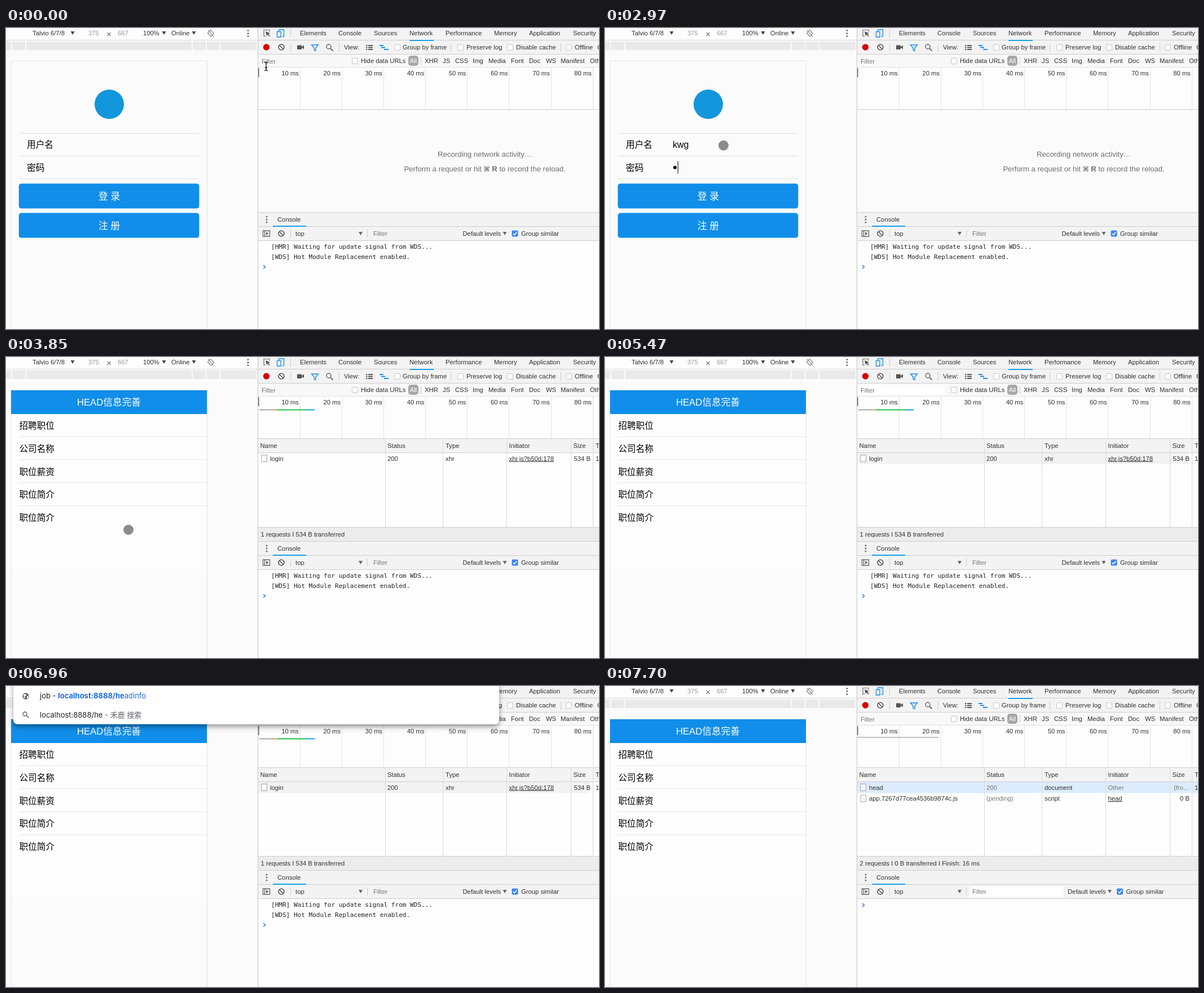
An HTML page that plays this animation: 1051x533 px, repeating every 8000 ms.

```html
<!DOCTYPE html>
<html lang="zh">
<head>
<meta charset="utf-8">
<style>
html, body { margin: 0; width: 100%; height: 100%; overflow: hidden; background: #fbfbfb; }
svg { display: block; width: 1051px; height: 533px; }
text { font-family: "Liberation Sans", "Noto Sans CJK SC", "DejaVu Sans", sans-serif; font-size: 11.25px; fill: #303030; white-space: pre; }
.cn { font-family: "Liberation Sans", "Noto Sans CJK SC", sans-serif; fill: #000; }
.mono { font-family: "DejaVu Sans Mono", monospace; font-size: 11.05px; fill: #222; }
.omni { font-family: Inter, "Noto Sans CJK SC", sans-serif; font-size: 13px; fill: #222; }
.key { font-family: "DejaVu Sans", sans-serif; font-size: 12px; font-weight: bold; }
</style>
</head>
<body>
<svg id="stage" viewBox="0 0 1051 533" xmlns="http://www.w3.org/2000/svg"></svg>
<script>
const LOOP = 8000;
const BLUE = '#108ee9', TAB = '#1aa0e8', BAR = '#f3f3f3', EDGE = '#cdcdcd', GRAY = '#777';

const text = (x, y, s, o = '') => `<text x="${x}" y="${y}" ${o}>${s}</text>`;
const rect = (x, y, w, h, fill, o = '') => `<rect x="${x}" y="${y}" width="${w}" height="${h}" fill="${fill}" ${o}/>`;
const hline = (x1, x2, y, c = EDGE) => rect(x1, y, x2 - x1, 1, c);
const vline = (x, y1, y2, c = EDGE) => rect(x, y1, 1, y2 - y1, c);
const path = (d, c = '#6e6e6e', w = 1.4) => `<path d="${d}" fill="none" stroke="${c}" stroke-width="${w}"/>`;
const solid = (d, c) => `<path d="${d}" fill="${c}"/>`;
const group = (id, s, o = '') => `<g id="${id}" ${o}>${s}</g>`;
const fill = c => `style="fill:${c}"`;
const arrow = (x, y, c = '#444') => solid(`M${x - 3.5} ${y - 3}h7l-3.5 6z`, c);
const dots = (x, y) => [-5, 0, 5].map(d => `<circle cx="${x}" cy="${y + d}" r="1.5" fill="#6e6e6e"/>`).join('');
const checkbox = (x, y) => rect(x - 4.5, y - 4.5, 10, 10, '#fff', 'rx="1.5" stroke="#c4c4c4"');
const ticked = (x, y) => rect(x - 5.5, y - 5.5, 11, 11, '#3b86f0', 'rx="2"') + path(`M${x - 3} ${y}l2.2 2.5 4-5`, '#fff', 1.6);
const banned = (x, y) => `<circle cx="${x}" cy="${y}" r="5" fill="none" stroke="#555" stroke-width="1.6"/>` + path(`M${x - 3.5} ${y - 3.5}l7 7`, '#555', 1.6);
const inspect = path('M460 14.5h-3v-11h10v3', '#6e6e6e', 1.2) + solid('M460 6l8 3.2-3 1.2 3 3.4-1.3 1.2-3-3.4-1.6 2.7z', '#555');

// Readouts of the device bar, also seen through the suggestion list
const deviceBar =
  text(146, 13, '375', fill('#999')) + path('M179.5 8l6 6m0-6l-6 6', '#777', 1.2) + text(198, 13, '667', fill('#999')) +
  text(243, 13, '100%') + arrow(280, 9) + text(293, 13, 'Online') + arrow(333, 9) +
  path('M357.5 9l5-5.5 6 6-5 5.5z', '#777', 1.1) + path('M358 3.5l10 12', '#777', 1.1) + dots(429, 9.5);

function deviceFrame() {
  const cells = [[0, 9], [11, 34], [36, 329], [331, 354], [356, 378], [380, 444]];
  return rect(0, 0, 446, 533, '#fbfbfb') + rect(0, 0, 446, 22, '#fdfdfd') + hline(0, 446, 21, '#d6d6d6') +
    text(47, 13, 'Talvio 6/7/8') + arrow(118, 9) + deviceBar +
    cells.map(([a, b]) => rect(a, 24, b - a, 15, '#e9e9e9')).join('') +
    hline(9, 357, 58, '#e5e5e5') + vline(8.5, 58, 533, '#e2e2e2') + vline(356, 58, 533, '#e2e2e2');
}

function loginPage() {
  const button = (y, s) => rect(22.7, y - 0.4, 319.7, 43.9, BLUE, 'rx="4.5"') +
    text(183, y + 27.5, s, 'class="cn" text-anchor="middle" style="font-size:17px;fill:#fff;font-weight:500"');
  return `<circle cx="183" cy="135" r="26" fill="#1296db"/>` +
    [186, 226, 266.5].map(y => hline(23, 342, y, '#dedede')).join('') +
    text(37, 212, '用户名', 'class="cn" style="font-size:15.7px"') +
    text(37, 252.5, '密码', 'class="cn" style="font-size:15.7px"') +
    text(120, 212, '', 'id="user" class="cn" style="font-size:16px"') +
    [0, 1, 2].map(i => `<circle id="pw${i}" cx="${124 + i * 9}" cy="247" r="3"/>`).join('') +
    rect(0, 0, 1, 22, '#000', 'id="caret"') +
    button(276, '登 录') + button(328, '注 册');
}

function infoPage() {
  const labels = ['招聘职位', '公司名称', '职位薪资', '职位简介', '职位简介'];
  return rect(9.5, 59, 346.5, 316, '#fdfdfd') + rect(9, 59, 347, 42, BLUE) +
    text(182.5, 86, 'HEAD信息完善', 'class="cn" text-anchor="middle" style="font-size:16.7px;fill:#fff"') +
    labels.map((s, i) => text(23.5, 127 + i * 40.75, s, 'class="cn" style="font-size:15.6px"') +
      (i < 4 ? hline(23, 356, 140.5 + i * 40.8, '#e6e6e6') : '')).join('');
}

function toolbars() {
  const tabs = [[521, 'Elements'], [589, 'Console'], [652, 'Sources'], [715, 'Network'], [779, 'Performance'],
    [865, 'Memory'], [927, 'Application'], [1005, 'Security']];
  const kinds = [[742, 'XHR'], [774, 'JS'], [796, 'CSS'], [827, 'Img'], [855, 'Media'], [895, 'Font'], [927, 'Doc'],
    [957, 'WS'], [983, 'Manifest'], [1035, 'Other']];
  const boxes = [[693, 703, 'Group by frame'], [805, 816, 'Preserve log'], [893, 904, 'Disable cache'], [997, 1008, 'Offline']];
  return rect(446, 0, 605, 70, BAR) + rect(447, 47, 604, 23, '#f8f8f8') + hline(446, 1051, 21) + hline(446, 1051, 46) + hline(446, 1051, 69.5) +
    inspect + path('M483.5 6v-3h9v12h-3', '#1a8cee', 1.3) + path('M480.5 6.5h6.5v9.5h-6.5z', '#1a8cee', 1.3) + vline(504, 2, 17) +
    tabs.map(([x, s]) => text(x, 13, s)).join('') + rect(715, 21, 43, 2, TAB) +
    '<circle cx="461.5" cy="34" r="5.7" fill="#d90000"/>' + banned(488, 34) + vline(504, 27, 42) +
    rect(516, 30.5, 8, 7.5, '#555') + solid('M523 34l5-3.5v7z', '#555') + path('M541.5 30h12l-4.7 5.5v5l-2.6-1.5v-3.5z', '#1a8cee', 1.4) +
    '<circle cx="572" cy="33" r="4" fill="none" stroke="#666" stroke-width="1.5"/>' + path('M575 36l4.5 4.5', '#666', 1.8) + vline(590, 27, 42) +
    text(599, 38, 'View:') +
    [30, 33.5, 37].map(y => rect(638, y, 2.5, 2, '#555') + rect(642, y, 8, 2, '#555')).join('') +
    [[662, 30, 7], [665, 33.5, 7], [670, 37, 8]].map(([x, y, w]) => rect(x, y, w, 2, '#1a8cee')).join('') +
    boxes.map(([b, x, s]) => checkbox(b, 34) + text(x, 38, s)).join('') + text(1048, 38, 'Online') + vline(788, 27, 42) + vline(983, 27, 42) +
    rect(450, 50, 152, 17, '#fff', 'id="filterBox"') + text(453, 63, 'Filter', fill(GRAY)) + checkbox(618, 58) + text(629, 62, 'Hide data URLs') +
    rect(713, 49, 18, 18, '#a6a6a6', 'rx="5"') + text(722, 62, 'All', 'text-anchor="middle" style="fill:#fff"') + vline(735, 51, 65) +
    kinds.map(([x, s]) => text(x, 62, s)).join('');
}

function timeline() {
  let s = rect(447, 70, 604, 75, '#fdfdfd');
  for (let i = 1; i <= 8; i++) {
    const x = 446.6 + i * 74.14;
    s += vline(Math.round(x), 70, 144, '#e3e3e3') + text(x - 1.8, 84, `${i * 10} ms`, 'text-anchor="end"');
  }
  return s + rect(447, 71, 1.5, 16, '#666') + hline(446, 1051, 144);
}

const waiting = rect(447, 145, 604, 181, '#fbfbfb') +
  text(848.5, 228, 'Recording network activity…', 'text-anchor="middle" style="font-size:13.2px;fill:#6e6e6e"') +
  text(848.5, 253.5, 'Perform a request or hit <tspan class="key">⌘</tspan><tspan font-weight="bold"> R</tspan> to record the reload.', 'text-anchor="middle" style="font-size:13.1px;fill:#6e6e6e"');

const cols = [450.5, 676, 779, 891.5, 1005.5, 1045];
const heads = ['Name', 'Status', 'Type', 'Initiator', 'Size', 'Time'];
const grid = rect(447, 145, 604, 157, '#fefefe') + rect(447, 145, 604, 24, BAR) + hline(446, 1051, 169) +
  heads.map((s, i) => text(cols[i], 161, s)).join('');
const gridLines = [672, 774, 887, 1001, 1040].map(x => vline(x, 145, 301, '#d9d9d9')).join('') +
  rect(447, 302, 604, 24, '#ececec') + hline(446, 1051, 301);

function row(y, name, status, type, from, size, o = {}) {
  const icon = rect(453, y - 10, 9.5, 12, '#fff', 'stroke="#999" stroke-width=".9"') + (o.script ? path(`M455 ${y - 6}l5 4`, '#ccc', 1) : '');
  return icon + text(468, y, name) + text(676, y, status, o.dim ? fill(GRAY) : '') + text(779, y, type) +
    text(891.5, y, from, o.plain ? fill(GRAY) : 'text-decoration="underline"') +
    text(1036, y, size, 'text-anchor="end" ' + (o.plain ? fill(GRAY) : '')) + (o.last ? '' : text(1045, y, '1'));
}

const loginRequest = rect(449, 92.5, 27, 2, '#a9a9a9') + rect(476, 92.5, 5, 2, '#e8a33d') + rect(481, 92.5, 50, 2, '#1fc34a') + rect(531, 92.5, 16, 2, '#1a9fe8') +
  grid + rect(447, 170, 587, 19.5, '#f2f2f2', 'id="hover"') + gridLines +
  row(183.5, 'login', '200', 'xhr', 'xhr.js?b50d:178', '534 B') +
  text(451.5, 317.5, '1 requests I 534 B transferred');

const reload = rect(447, 90, 144, 2, '#c2c2c2') + grid + rect(447, 170, 604, 19.5, '#dcecfd') + gridLines +
  row(183.5, 'head', '200', 'document', 'Other', '(fro…', { dim: 1, plain: 1, script: 1 }) +
  row(203, 'app.7267d77cea4536b9874c.js', '(pending)', 'script', 'head', '0 B', { dim: 1, script: 1, last: 1 }) +
  text(451.5, 317.5, '2 requests I 0 B transferred I Finish: 16 ms');

const chevron = y => path(`M456 ${y - 3}l3.5 3-3.5 3`, '#2f80f0', 1.6);
const consolePane = rect(446, 326, 605, 50, BAR) + rect(447, 376, 604, 157, '#fdfdfd') +
  [326, 351, 376].map(y => hline(446, 1051, y)).join('') +
  dots(462, 339) + text(481, 342.5, 'Console') + rect(473, 350, 59, 2, TAB) +
  path('M455.5 359h12v10h-12zM458.5 359v10', '#666', 1.3) + solid('M461 361l4.5 3-4.5 3z', '#666') + banned(488, 364) +
  vline(504, 357, 371) + text(513, 367.5, 'top') + arrow(628.5, 364, '#666') + vline(640, 357, 371) +
  rect(647, 355, 166, 18, '#fff', 'id="wideFilter"') + text(651, 368, 'Filter', fill(GRAY)) +
  group('levels', text(809.5, 367.5, 'Default levels') + arrow(884, 364, '#666') + ticked(902, 364) + text(913, 367.5, 'Group similar')) +
  group('logs', text(470, 391, '[HMR] Waiting for update signal from WDS...', 'class="mono"') +
    text(470, 409, '[WDS] Hot Module Replacement enabled.', 'class="mono"') + chevron(423)) +
  group('cleared', chevron(388));

const suggestions = rect(13, -20, 861, 87.5, '#fff', 'rx="7" filter="url(#shade)"') +
  '<circle cx="35" cy="18" r="5.7" fill="#5f6368"/>' + solid('M31 15l4-1 1 3-3 1 1 3-2 1zM37 18l3-1-1 4-2 1z', '#fff') +
  text(60, 22, 'job - <tspan font-weight="bold" fill="#1a6cec" id="typedUrl"></tspan><tspan fill="#1a6cec" id="restUrl"></tspan>', 'class="omni"') +
  '<circle cx="33.5" cy="49.5" r="3.5" fill="none" stroke="#5f6368" stroke-width="1.4"/>' + path('M36 52l4.5 4.5', '#5f6368', 1.5) +
  text(60, 55.5, '<tspan id="query"></tspan><tspan fill="#5f6368"> - 禾鹿 搜索</tspan>', 'class="omni"') +
  group('leftover', rect(152, 0, 328, 14, '#fdfdfd') + deviceBar + inspect, 'clip-path="url(#strip)"');

const pointers =
  group('touch', '<circle r="9" fill="#8b8b8b"/>') +
  group('beam', path('M-3 -7.5q3 0 3 2.5q0-2.5 3-2.5M0 -5v10M-3 7.5q3 0 3-2.5q0 2.5 3 2.5M-2 2h4', '#111', 1.3)) +
  group('mouse', '<path d="M0 0v15l3.6-3.3 2.5 5.7 2.5-1-2.5-5.6h5z" fill="#000" stroke="#fff"/>');

document.getElementById('stage').innerHTML =
  `<defs><filter id="shade" x="-5%" y="-30%" width="110%" height="170%"><feDropShadow dx="0" dy="5" stdDeviation="4.5" flood-opacity=".38"/></filter>
  <clipPath id="strip"><rect x="152" y="0" width="328" height="15"/></clipPath></defs>` +
  deviceFrame() + group('login', loginPage()) + group('info', infoPage()) +
  toolbars() + timeline() + group('waiting', waiting) + group('request', loginRequest) + group('reload', reload) +
  consolePane + vline(446, 0, 533, '#c6c6c6') + group('suggest', suggestions) + pointers;

const $ = {};
document.querySelectorAll('[id]').forEach(e => $[e.id] = e);
const show = (id, on) => $[id].setAttribute('display', on ? 'inline' : 'none');
const put = (id, x, y) => $[id].setAttribute('transform', `translate(${x} ${y})`);
const passed = (t, times) => times.filter(a => t >= a).length;

// Pointer stops: time, kind, x, y
const stops = [
  [0, 'beam', 461, 68], [140, 'mouse', 482, 30], [290, 'touch', 353, 62], [440, 'touch', 315, 163], [590, 'touch', 319, 175],
  [740, 'touch', 237, 190], [880, 'touch', 213, 204], [1030, 'touch', 210, 208],
  [3410, 'touch', 213, 262], [3560, 'touch', 217, 303], [3710, 'touch', 217, 306],
  [4150, 'touch', 381, 237], [4300, 'mouse', 485, 230], [4440, 'mouse', 600, 195], [4590, 'mouse', 620, 172],
  [4740, 'beam', 555, 59], [4880, 'touch', 362, 25], [5030, 'touch', 198, 30], [5180, 'touch', 218, 22],
  [5320, 'touch', 218, 3], [5470, '', 0, 0]
];
const stopTimes = stops.map(s => s[0]);
const caretX = [120, 128, 139.6, 148.5];

function draw(t) {
  const answered = t >= 3710, inLogin = t < 3850, fresh = t >= 7700;
  show('login', inLogin);
  show('info', !inLogin);
  show('waiting', !answered);
  show('request', answered && !fresh);
  show('reload', fresh);
  show('hover', t >= 4590);
  show('filterBox', t >= 4740 && !fresh);
  show('wideFilter', fresh);
  show('logs', !fresh);
  show('cleared', fresh);
  put('levels', fresh ? 10.5 : 0, 0);

  const typed = passed(t, [1770, 2070, 2220]);
  const hidden = passed(t, [2970, 3120, 3270]);
  const inPassword = t >= 2520;
  $.user.textContent = 'kwg'.slice(0, typed);
  for (let i = 0; i < 3; i++) show('pw' + i, i < hidden);
  show('caret', t >= 1030 && (t < 1480 || t >= 1770));
  put('caret', inPassword ? 120 + hidden * 8.8 : caretX[typed], inPassword ? 236 : 195);

  const word = 'head', n = 1 + passed(t, [6960, 7110, 7260]);
  const url = 'localhost:8888/' + word.slice(0, n);
  show('suggest', t >= 6660 && t < 7560);
  show('leftover', t < 6810);
  $.typedUrl.textContent = $.query.textContent = url;
  $.restUrl.textContent = word.slice(n) + 'info';

  const [, kind, x, y] = stops[passed(t, stopTimes) - 1];
  for (const id of ['touch', 'beam', 'mouse']) show(id, id === kind);
  if (kind) put(kind, x, y);
}

const start = performance.now();
function tick() {
  draw((performance.now() - start) % LOOP);
  requestAnimationFrame(tick);
}
tick();
</script>
</body>
</html>
```
